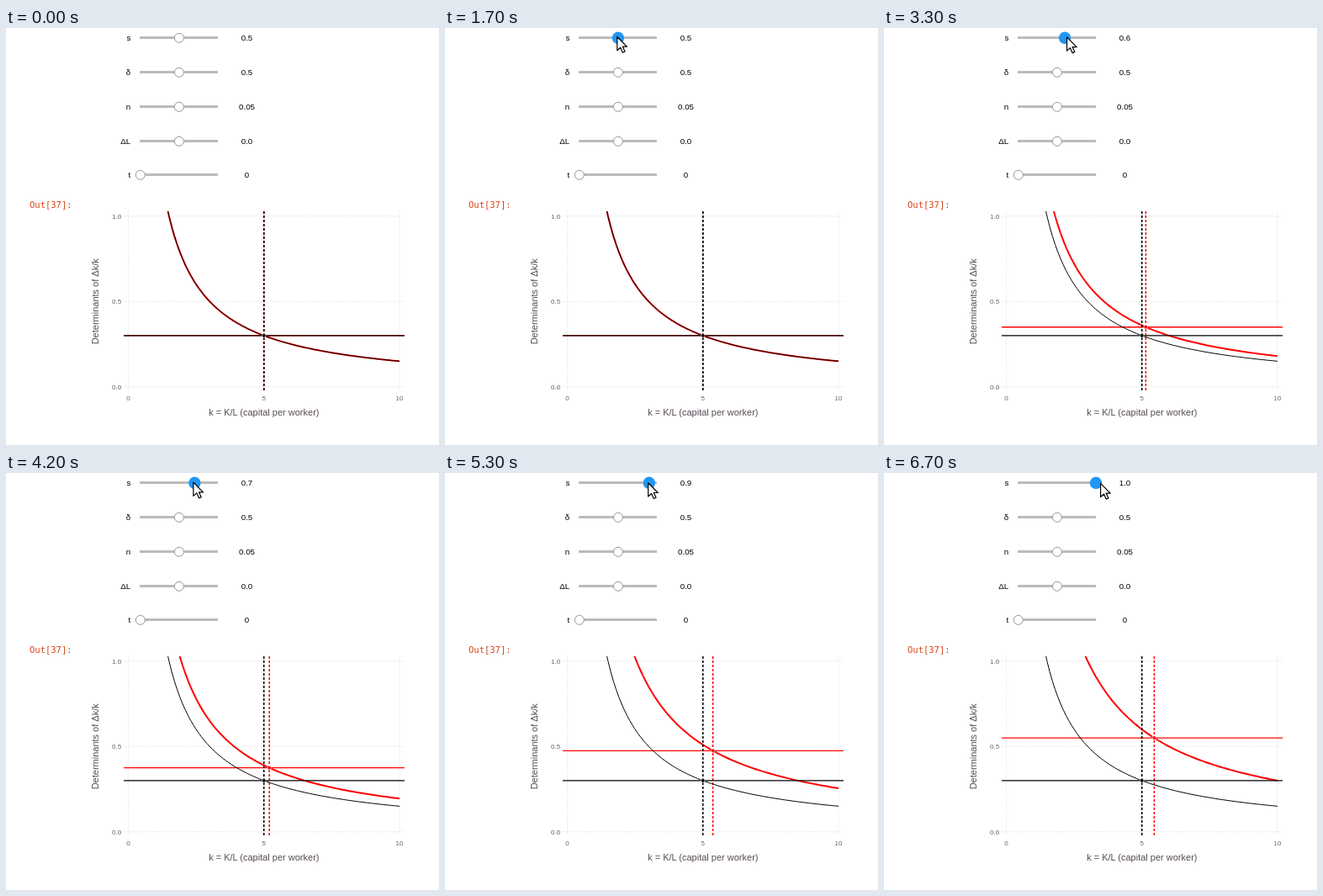
Write an HTML page that moves like this. It is 515 px wide and 496 px high and loops after 8000 ms.

```html
<!DOCTYPE html>
<html lang="en">
<head>
<meta charset="utf-8">
<title>Growth model sliders</title>
<style>
  html, body { margin: 0; width: 100%; height: 100%; overflow: hidden; background: #fff; }
  svg { display: block; width: 515px; height: 496px; }
  text { font-family: "Liberation Sans", Arial, sans-serif; }
  .ui { font-size: 9.75px; fill: #000; }
  .out { font: 10.5px "DejaVu Sans Mono", monospace; fill: #d84315; }
  .tick { font-size: 8px; fill: #6c606b; }
  .title { font-size: 11px; fill: #564a55; }
  .grid { stroke: #d0d0e0; stroke-width: .6; stroke-dasharray: 1.4 1.4; }
  .mid { text-anchor: middle; }
  .end { text-anchor: end; }
</style>
</head>
<body>
<svg viewBox="0 0 515 496">
  <defs><clipPath id="area"><rect x="140" y="218" width="334" height="213"/></clipPath></defs>
  <g id="sliders"></g>
  <text class="out" x="28" y="214">Out[37]:</text>
  <g id="axes"></g>
  <text class="title mid" x="306.8" y="461">k = K/L (capital per worker)</text>
  <text class="title mid" transform="translate(110 325.3) rotate(-90)">Determinants of Δk/k</text>
  <g id="plot" clip-path="url(#area)" fill="none"></g>
  <path id="cursor" d="M0 0V16.2L3.9 12.7L6.6 18.7L9.3 17.5L6.6 11.7H11.6Z"
        fill="#fff" stroke="#000" stroke-width="1.2" stroke-linejoin="round"/>
</svg>
<script>
const LOOP = 8000, STEP = 100;
const DELTA = 0.5, N = 0.05;
const byId = id => document.getElementById(id);
const clamp01 = u => Math.min(1, Math.max(0, u));

function set(el, attrs) {
  for (const name in attrs) el.setAttribute(name, attrs[name]);
}
function add(parent, tag, attrs, text) {
  const el = document.createElementNS("http://www.w3.org/2000/svg", tag);
  set(el, attrs);
  if (text !== undefined) el.textContent = text;
  parent.appendChild(el);
  return el;
}

// Plot coordinates
const px = k => 145.5 + 32.25 * k;
const py = v => 426.8 - 203.1 * v;

// Sliders sit on whole pixels, as page layout would place them
const TRACK_X = 159.8, TRACK_W = 92.2;
const thumbX = u => TRACK_X + TRACK_W * u;
function makeSlider([name, value, u], row) {
  const g = byId("sliders"), y = Math.round(10.25 + 40.75 * row);
  add(g, "text", { class: "ui end", x: 148.3, y: y + 5 }, name);
  add(g, "rect", { x: 159, y, width: 93, height: 3, rx: .6, fill: "#bbb" });
  return {
    thumb: add(g, "circle", { cx: thumbX(u), cy: y + 1.8, r: 5.5, fill: "#fff", stroke: "#999" }),
    label: add(g, "text", { class: "ui mid", x: 286.5, y: y + 5 }, value)
  };
}
const [saving] = [
  ["s", "0.5", .5], ["δ", "0.5", .5], ["n", "0.05", .5], ["ΔL", "0.0", .5], ["t", "0", 0]
].map(makeSlider);

// Grid and ticks
const axes = byId("axes");
for (const v of [0, .5, 1]) {
  add(axes, "path", { class: "grid", d: `M140 ${py(v)}H474` });
  add(axes, "text", { class: "tick end", x: 137.2, y: py(v) + 2.9 }, v.toFixed(1));
}
for (const k of [0, 5, 10]) {
  add(axes, "path", { class: "grid", d: `M${px(k)} 218V431` });
  add(axes, "text", { class: "tick mid", x: px(k), y: 443 }, k);
}

// One family holds the curve, both guide lines and the steady-state point
function makeFamily(color, curveWidth) {
  const g = byId("plot");
  const line = (width, dash) =>
    add(g, "path", { stroke: color, "stroke-width": width, "stroke-dasharray": dash });
  return {
    curve: line(curveWidth, "none"),
    level: line(1.4, "none"),
    steady: line(1.5, "3 2"),
    point: add(g, "circle", { r: 2.3, fill: color, stroke: "#fff", "stroke-width": .6 })
  };
}
function drawFamily(f, s) {
  const h = s * DELTA + N, k0 = 3 * s / h;
  let d = "";
  for (let k = 1; k < 10.01; k += .1) {
    d += `${d ? "L" : "M"}${px(k).toFixed(2)} ${py(3 * s / k).toFixed(2)}`;
  }
  set(f.curve, { d });
  set(f.level, { d: `M140 ${py(h)}H474` });
  set(f.steady, { d: `M${px(k0)} 218V431` });
  set(f.point, { cx: px(k0), cy: py(h) });
}
const current = makeFamily("#f00", 2);
const base = makeFamily("#000", 1);
drawFamily(base, .5);

// The pointer glides in, presses, then drags right in a few strokes
const ENTER = 300, ARRIVE = 1100, PRESS = 1700, PLOT_LAG = 200;
const GRAB_X = 204.8;
const STROKES = [ // start, end, x reached
  [2200, 2600, 210.6], [2900, 3100, 216.6], [3200, 3400, 218.5], [3700, 3900, 220],
  [4000, 5000, 234.5], [5000, 5500, 246.5], [5500, 6200, 253], [6300, 6700, 257.6]
];
function pointerAt(t) {
  const u = clamp01((t - ENTER) / (ARRIVE - ENTER));
  if (u < 1) {
    return { x: 161 + (GRAB_X - 161) * (1 - (1 - u) ** 1.3), y: -9 + 19.5 * u };
  }
  let x = GRAB_X;
  for (const [from, to, end] of STROKES) x += (end - x) * clamp01((t - from) / (to - from));
  return { x, y: 10.5 + (x - GRAB_X) * .035 };
}

// The slider follows the pointer and snaps to steps of 0.05
function savingAt(t) {
  if (t < PRESS) return .5;
  const u = (pointerAt(t).x - .7 - TRACK_X) / TRACK_W;
  return Math.round(clamp01(u) * 20) / 20;
}

function render(time) {
  const t = Math.floor(time % LOOP / STEP) * STEP;
  const s = savingAt(t), pressed = t >= PRESS;
  set(saving.thumb, {
    cx: thumbX(s),
    r: pressed ? 7.2 : 5.5,
    fill: pressed ? "#2196f3" : "#fff",
    stroke: pressed ? "none" : "#999"
  });
  saving.label.textContent = s === 1 ? "1.0" : String(s);
  drawFamily(current, savingAt(t - PLOT_LAG));

  const { x, y } = pointerAt(t);
  set(byId("cursor"), {
    visibility: t >= ENTER ? "visible" : "hidden",
    transform: `translate(${x} ${y})`
  });
}

const start = performance.now();
function frame() {
  render(performance.now() - start);
  requestAnimationFrame(frame);
}
frame();
</script>
</body>
</html>
```
